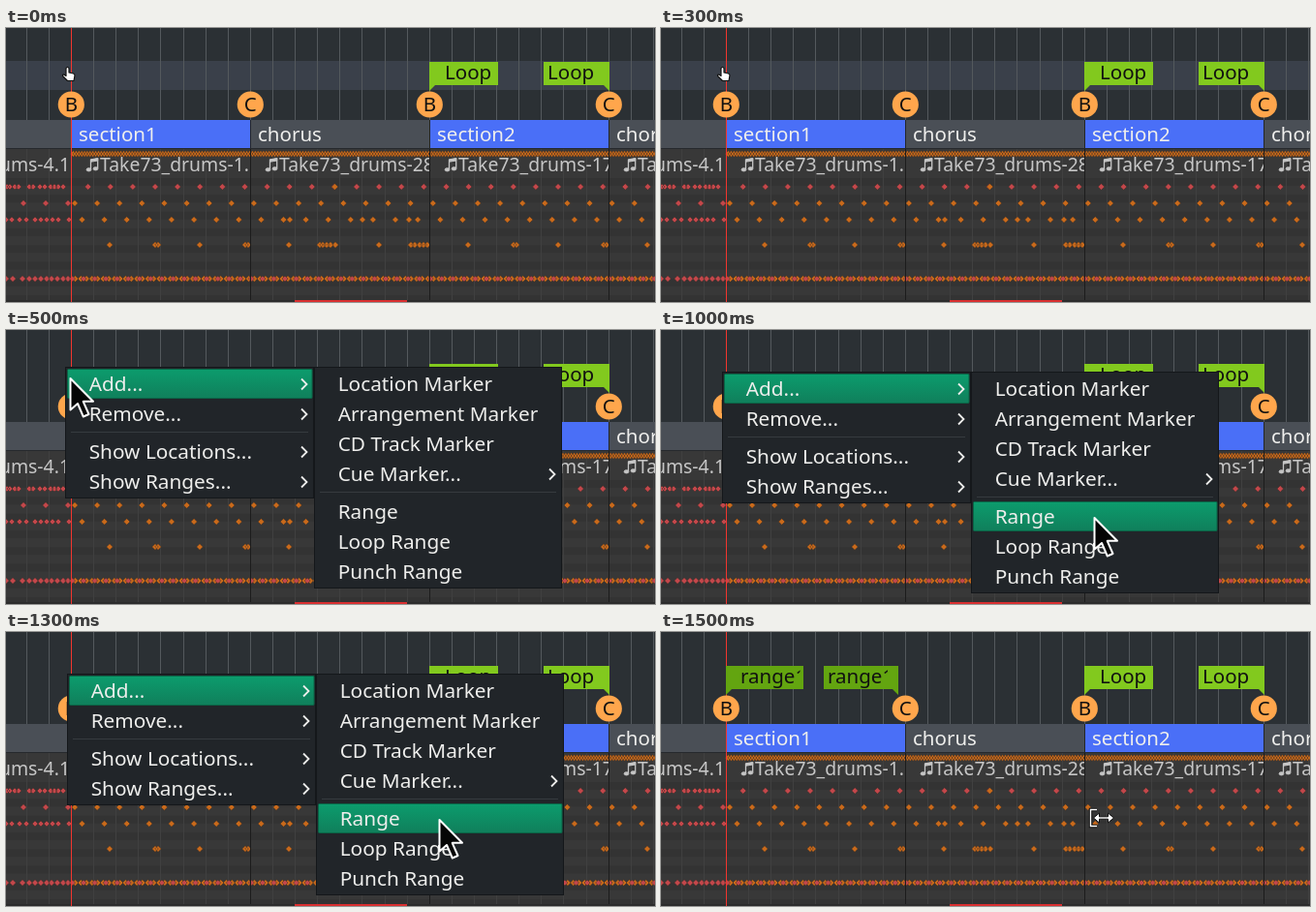
An HTML page that plays this animation: 670x283 px, repeating every 2000 ms.

```html
<!DOCTYPE html>
<html lang="en">
<head>
<meta charset="utf-8">
<title>Adding a range marker</title>
<style>
  html, body { margin: 0; width: 100%; height: 100%; overflow: hidden; background: #2b3034; }
  svg { display: block; width: 670px; height: 283px; }
  text { font-family: "Noto Sans", "Open Sans", sans-serif; font-size: 20.5px; white-space: pre; }
  .region { font-size: 19.4px; }
  .menu { font-size: 20.8px; }
</style>
</head>
<body>
<svg id="stage" viewBox="0 0 670 283">
  <defs>
    <linearGradient id="pick" x2="0" y2="1">
      <stop stop-color="#0c9c6d"/><stop offset="1" stop-color="#107f5b"/>
    </linearGradient>
    <g id="note" fill="#c6c6c6" stroke="#c6c6c6">
      <ellipse cx="3" cy="12.3" rx="2.4" ry="1.6"/>
      <ellipse cx="10" cy="11.3" rx="2.4" ry="1.6"/>
      <path d="M5 12V2.2L12.2 1V11" fill="none" stroke-width="1.3"/>
      <path d="M5 1.8L12.2 .6V3L5 4.2Z"/>
    </g>
    <path id="arrow" d="M0 0V32.5L7.5 26L13.3 39.5L19 37L13.2 23.8H23.5Z"
      fill="#050505" stroke="#fff" stroke-width="2" stroke-linejoin="round"/>
  </defs>
</svg>
<script>
const STEP = 500, LOOP = 4 * STEP;
const BAR = 184.88, BEAT = BAR / 8, LEFT = 67.5;
const ORANGE = '#c96a1b', RED = '#c3474b', PLAYHEAD = '#f2352f';
const stage = document.getElementById('stage');
const barAt = i => Math.floor(LEFT + i * BAR);
let clips = 0;

const rect = (x, y, w, h, fill, more = '') =>
  `<rect x="${x}" y="${y}" width="${w}" height="${h}" fill="${fill}" ${more}/>`;
const text = (x, y, s, fill = '#eeeeec', more = '') =>
  `<text x="${x}" y="${y}" fill="${fill}" ${more}>${s}</text>`;
const line = (d, stroke, width = 1) =>
  `<path d="${d}" fill="none" stroke="${stroke}" stroke-width="${width}"/>`;
const clipped = (x, y, w, h, body) => {
  const id = 'clip' + clips++;
  return `<clipPath id="${id}">${rect(x, y, w, h, '#000')}</clipPath><g clip-path="url(#${id})">${body}</g>`;
};
const series = (from, to, step) =>
  Array.from({ length: Math.max(0, Math.ceil((to - from) / step)) }, (_, i) => from + i * step);
const beatLines = (top, bottom, stroke) =>
  line(series(LEFT - 2 * BEAT, 670, BEAT).map(x => `M${Math.floor(x) + .5} ${top}V${bottom}`).join(''), stroke);
const hits = (xs, y, fill, r = 3.3) =>
  `<path d="${xs.map(x => `M${(x - r).toFixed(1)} ${y}l${r}-${r} ${r} ${r}-${r} ${r}z`).join('')}" fill="${fill}" stroke="#3a2c24" stroke-width=".5"/>`;

function sections() {
  const names = ['section1', 'chorus', 'section2', 'chorus'];
  return rect(0, 95, 670, 29, '#4a4f56') + names.map((s, i) => {
    const x = barAt(i);
    return rect(x, 95, barAt(i + 1) - x, 29, i % 2 ? '#4a4f56' : '#4a6ff7') + text(x + 8, 117, s)
      + line(`M${x + .5} 95V124`, '#23262a');
  }).join('') + line('M0 124.5H670', '#26292c');
}

function badges() {
  return [...'BCBC'].map((s, i) => {
    const x = barAt(i) + .3;
    return `<circle cx="${x}" cy="79" r="13.6" fill="#ffa64c"/>`
      + text(x, 86, s, '#111', 'text-anchor="middle"');
  }).join('');
}

function track() {
  const takes = ['1.1', '28.1', '17.1', '2.1'];
  const grey = '#c6c6c6';
  let out = rect(0, 125, 670, 158, '#383838');
  out += series(155, 283, 17.3).map(y => rect(0, y, 670, 8, '#333')).join('');
  out += beatLines(125, 283, '#404040');
  out += text(66, 148, 'drums-4.1', grey, 'class="region" text-anchor="end"');
  takes.forEach((s, i) => {
    const x = barAt(i);
    out += clipped(x, 126, barAt(i + 1) - x, 30, `<use href="#note" x="${x + 15.5}" y="134"/>`
      + text(x + 30, 148, 'Take73_drums-' + s, grey, 'class="region"'));
  });
  return out + notes() + line([1, 2, 3].map(i => `M${barAt(i) + .5} 125V283`).join(''), '#1c1c1c')
    + rect(0, 281, 670, 2, '#2c2c2c') + rect(298, 281, 116, 2, '#d92f30');
}

function notes() {
  const pairs = [40, 87, 90, 133, 180, 183];
  const fills = [40, 72, 75, 79, 83, 88, 133, 166, 170, 175, 179, 183];
  const tom = [pairs, fills, pairs, [40]].flatMap((p, i) => p.map(x => barAt(i) + x));
  const dense = BAR / 32;
  return hits(series(LEFT + 2, 673, dense / 2), 130, ORANGE)
    + hits([1, 4, 9, 13, 24, 28, 35, 40, 46, 50, 54, 59], 164, RED, 3)
    + hits(series(84.7, 670, BEAT), 164, RED)
    + hits([339.5], 164, ORANGE)
    + hits([18, 41, 64], 181, RED)
    + hits(series(71, 670, BEAT), 181, ORANGE)
    + hits([0, 6, 14, 21, 30, 36, 42, 48, 54, 65], 198, RED, 3)
    + hits(series(78.5, 670, BEAT).concat(293, 368, 416), 198, ORANGE)
    + hits(tom, 224, ORANGE)
    + hits([0, 7, 17, 24, 30, 36, 42, 47, 53, 59, 64], 259, RED)
    + hits(series(LEFT + 4, 673, dense), 259, ORANGE)
    + hits(series(LEFT + 1, 673, dense * 2), 259, RED, 3);
}

const playhead = () => line(`M${LEFT} 0V283`, PLAYHEAD);

// A flag with its tip on the left (side 0) or right (side 1) edge.
function flag(x, w, side, fill, s, dx, shown) {
  const r = x + w;
  const d = side ? `M${x} 35H${r}V65L${r - 6} 59H${x}Z` : `M${x} 35H${r}V59H${x + 6}L${x} 65Z`;
  return `<path d="${d}" fill="${fill}"/>` + clipped(x, 35, shown, 30, text(x + dx, 53, s, '#111'));
}
const loopFlags = () =>
  flag(437, 71, 0, '#82c91e', 'Loop', 16, 71) + flag(555, 68, 1, '#82c91e', 'Loop', 4, 68);
const rangeFlags = () =>
  flag(67, 80, 0, '#63a510', 'range1', 15, 76.5) + flag(168, 77, 1, '#63a510', 'range1', 4, 66);

const chevron = (x, y) => line(`M${x - 3} ${y - 5.5}l5.5 5.5-5.5 5.5`, '#eeeeec', 1.8);

function panel(x, y, w, h, labels, picked, arrows) {
  let out = rect(x + .5, y + .5, w - 1, h - 1, '#212529', 'stroke="#14171a"');
  let top = y + 3;
  labels.forEach((s, i) => {
    if (!s) {
      out += line(`M${x + 6} ${top + 2.5}H${x + w - 6}`, '#363b3f');
      top += 8;
      return;
    }
    if (i === picked) {
      out += rect(x + 2.5, top - .5, w - 4.5, 30, 'url(#pick)', 'stroke="#0a6446" rx="1"');
    }
    out += text(x + 24.7, top + 22, s, '#eeeeec', 'class="menu"');
    if (arrows.includes(i)) out += chevron(x + w - 10, top + 15);
    top += 31;
  });
  return out;
}

function menus(x, y, picked) {
  return panel(x, y, 257, 136, ['Add...', 'Remove...', '', 'Show Locations...', 'Show Ranges...'], 0, [0, 1, 3, 4])
    + panel(x + 257, y, 256, 229, ['Location Marker', 'Arrangement Marker', 'CD Track Marker',
      'Cue Marker...', '', 'Range', 'Loop Range', 'Punch Range'], picked, [3]);
}

const arrow = (x, y) => `<use href="#arrow" x="${x}" y="${y}"/>`;
const hand = () => `<path d="M62 41.5q1.5-2 3 0v4.5l4.5 1q1.5.5 1.5 2l-1 5.5h-6.5l-5-5q-.3-1.8 1.5-1.3l2 1.3z"
  fill="#fff" stroke="#111" stroke-width="1.2" stroke-linejoin="round"/>`;
const trim = () => {
  const bracket = 'M450 183.5H443.5V200.5H450';
  const sides = 'M446.5 192l6-5v3.8h9V187l6 5-6 5v-3.8h-9V197z';
  return line(bracket, '#111', 3.4) + line(bracket, '#fff', 1.4)
    + `<path d="${sides}" fill="#fff" stroke="#111" stroke-width="1"/>`;
};

// Each layer: markup and the steps in which it shows.
const layers = [
  [rect(0, 34, 670, 30, '#3a404a'), [0]],
  [beatLines(0, 95, '#54595d') + track() + sections() + playhead() + loopFlags(), [0, 1, 2, 3]],
  [rangeFlags(), [3]],
  [badges(), [0, 1, 2, 3]],
  [hand(), [0]],
  [menus(61, 38, -1) + arrow(66.5, 50), [1]],
  [menus(63, 43, 5) + arrow(447.5, 194), [2]],
  [trim(), [3]]
];

for (const [markup, steps] of layers) {
  const g = document.createElementNS('http://www.w3.org/2000/svg', 'g');
  g.innerHTML = markup;
  stage.append(g);
  if (steps.length === 4) continue;
  const frames = [0, 1, 2, 3, 4].map(i => ({
    offset: i * STEP / LOOP,
    opacity: steps.includes(i % 4) ? 1 : 0,
    easing: 'step-end'
  }));
  g.animate(frames, { duration: LOOP, iterations: Infinity });
}
</script>
</body>
</html>
```
